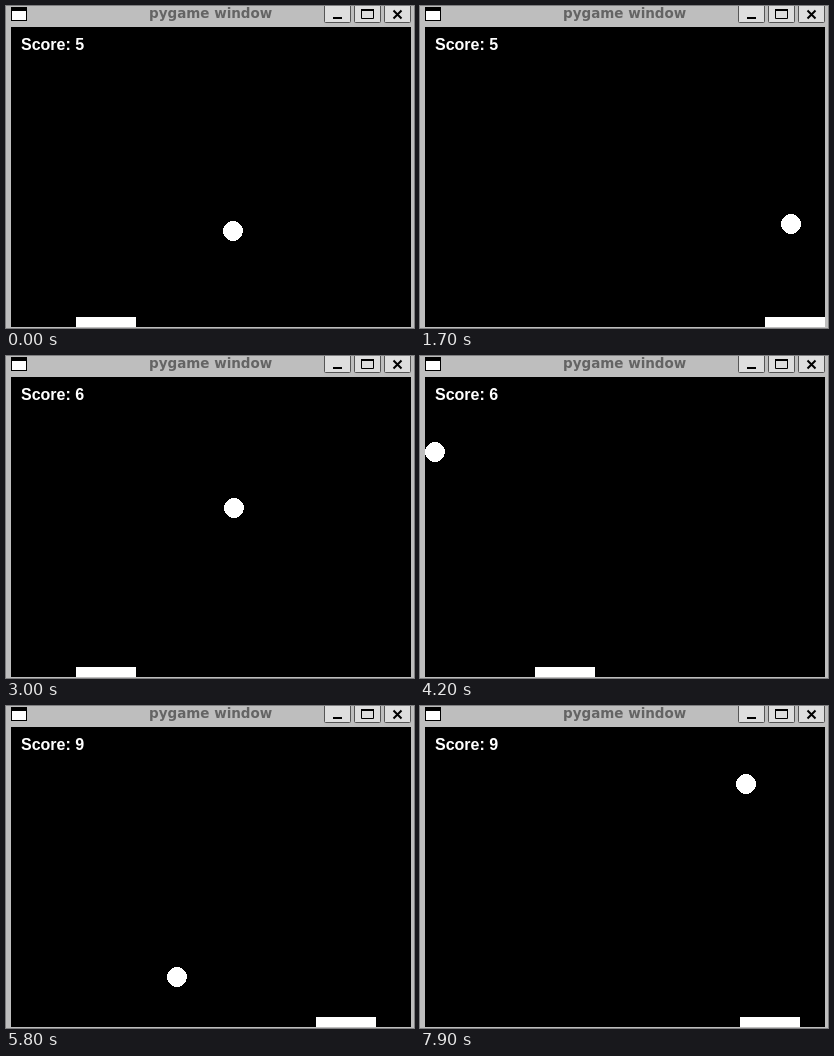
These frames come from a looping animation (408 by 322 pixels, 8000 ms). An HTML page:

```html
<!DOCTYPE html>
<html lang="en">
<head>
<meta charset="utf-8">
<title>Paddle game</title>
<style>
  html, body { margin: 0; width: 100%; height: 100%; overflow: hidden; background: #bebebe; }
  svg { display: block; }
  .title { font: bold 13.5px "DejaVu Sans", sans-serif; fill: #646464; }
  .score { font: bold 16px "Liberation Sans", Arial, sans-serif; fill: #fff; }
  .crisp { shape-rendering: crispEdges; }
</style>
</head>
<body>
<svg width="408" height="322" viewBox="0 0 408 322">
  <rect width="408" height="322" fill="#bebebe"/>

  <!-- title bar -->
  <g class="crisp">
    <rect x="5" y="1" width="16" height="14"/>
    <rect x="6" y="5" width="14" height="9" fill="#fff"/>
  </g>
  <text class="title" x="143" y="12">pygame window</text>
  <g fill="#dedede" stroke="#555">
    <rect x="318.5" y="-3.5" width="26" height="20" rx="1"/>
    <rect x="348.5" y="-3.5" width="26" height="20" rx="1"/>
    <rect x="378.5" y="-3.5" width="26" height="20" rx="1"/>
  </g>
  <rect x="327" y="11" width="9" height="2"/>
  <path d="M355.5 4V12.5H367.5V4" fill="none" stroke="#000"/>
  <rect x="355" y="3" width="13" height="2"/>
  <path d="M387.5 4.5l8 8m0-8l-8 8" stroke="#000" stroke-width="2"/>

  <!-- playfield -->
  <rect x="5" y="21" width="400" height="300"/>
  <text class="score" id="score" x="15" y="44">Score: 5</text>
  <circle class="crisp" id="ball" r="10" fill="#fff"/>
  <rect class="crisp" id="paddle" y="311" width="60" height="10" fill="#fff"/>
</svg>
<script>
const LOOP = 8000, STEP = 100;
const LEFT = 15, RIGHT = 395, TOP = 31;   // limits of the ball's centre
const PADDLE_SPEED = 32.5;                // px per step, like the ball's vx and vy
const FIRST_HIT = 2070, LAST_HIT = 5450;

// Straight flights; walls are handled by reflection.
const flights = [
  { at: 0, x: 227, y: 225, vx: 8.47, vy: -22.4 },
  { at: FIRST_HIT, x: 393, y: 296, vx: -17.75, vy: -15.5 },
  { at: 4200, x: 15, y: 96, vx: 19, vy: 16.5 },
  { at: LAST_HIT, x: 249, y: 304, vx: -22.3, vy: -9.5 },
  { at: 6600, x: 22, y: 201, vx: 23.4, vy: -9.46 }
];

// The player heads for a new goal at each of these times.
const moves = [
  { at: 850, goal: 345 }, { at: 2150, goal: 5 }, { at: 3700, goal: 115 },
  { at: 4700, goal: 280 }, { at: 5350, goal: 255 }, { at: 5630, goal: 345 },
  { at: 6900, goal: 320 }
];

const ball = document.getElementById("ball");
const paddle = document.getElementById("paddle");
const score = document.getElementById("score");

function ballAt(t) {
  const f = flights.findLast(f => f.at <= t);
  const steps = (t - f.at) / STEP;
  const x = LEFT + Math.abs(f.x + f.vx * steps - LEFT);
  const y = TOP + Math.abs(f.y + f.vy * steps - TOP);
  return [RIGHT - Math.abs(RIGHT - x), y];
}

function paddleAt(t) {
  let x = 70;
  moves.forEach(({ at, goal }, i) => {
    const end = Math.min(t, moves[i + 1]?.at ?? LOOP);
    const reach = Math.max(0, end - at) / STEP * PADDLE_SPEED;
    x += Math.max(-reach, Math.min(reach, goal - x));
  });
  return Math.round(x / 5) * 5;
}

function draw(now) {
  const t = Math.floor(now % LOOP / STEP) * STEP;
  const [x, y] = ballAt(t);
  ball.setAttribute("cx", Math.round(x));
  ball.setAttribute("cy", Math.round(y));
  paddle.setAttribute("x", paddleAt(t));
  score.textContent = "Score: " + (t < FIRST_HIT ? 5 : t < LAST_HIT ? 6 : 9);
}

const start = performance.now();
function tick() {
  draw(performance.now() - start);
  requestAnimationFrame(tick);
}
tick();
</script>
</body>
</html>
```
